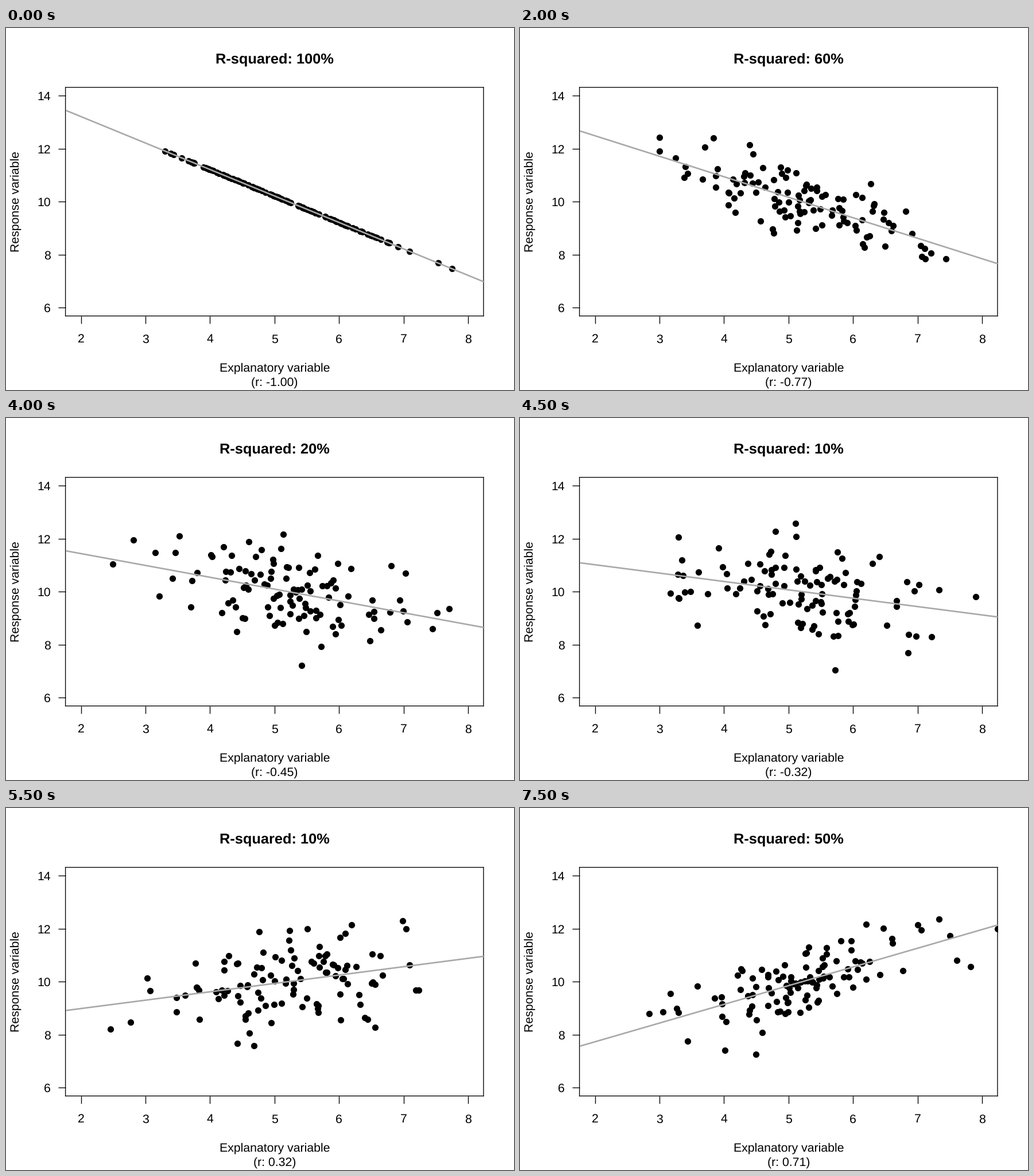
Animation of 885x632 px, one loop 8 s. Source, as a matplotlib script:

```python
import numpy as np
import matplotlib.pyplot as plt
from matplotlib.animation import FuncAnimation

W, H, DPI = 885, 632, 64
PT = 72 / DPI                      # points per pixel
LEFT, RIGHT, TOP, BOTTOM = 103.6, 831.9, 103.6, 502.7
X0, X1, Y0, Y1 = 1.76, 8.24, 5.68, 14.32
STEPS, N = 16, 110
MEAN_X, MEAN_Y = 5.215, 10

plt.rcParams.update({
    "font.family": "Liberation Sans",
    "text.hinting": "no_hinting",
    "axes.unicode_minus": False,
})


def correlation(step):
    """R-squared falls from 1 to 0 in tenths, then rises with r positive."""
    share = abs(10 - step) / 10
    return share, np.sqrt(share) * (-1 if step < 10 else 1) if share else 0.0


def standardize(v):
    return (v - v.mean()) / v.std(ddof=1)


def cloud(step, r):
    """Normal sample whose correlation is exactly r."""
    x, e = np.random.default_rng(70 + step).standard_normal((2, N))
    x = standardize(x)
    e = standardize(e - x * (e @ x) / (x @ x))
    return MEAN_X + x, MEAN_Y + r * x + np.sqrt(1 - r * r) * e


fig = plt.figure(figsize=(W / DPI, H / DPI), dpi=DPI, facecolor="white")
ax = fig.add_axes([LEFT / W, 1 - BOTTOM / H, (RIGHT - LEFT) / W, (BOTTOM - TOP) / H])
ax.set(xlim=(X0, X1), ylim=(Y0, Y1), xticks=range(2, 9), yticks=range(6, 15, 2))
ax.tick_params(length=12.6 * PT, width=1.35 * PT, labelbottom=False, labelleft=False)
for spine in ax.spines.values():
    spine.set(linewidth=1.35 * PT, snap=False)
for tick in ax.get_xticklines() + ax.get_yticklines():
    tick.set_snap(False)


def label(x, y, text="", size=21.2, **kw):
    """Text with its baseline at pixel (x, y) from the top left."""
    kw = {"ha": "center", "va": "baseline", "rotation_mode": "anchor", **kw}
    return fig.text(x / W, 1 - y / H, text, fontsize=size * PT, **kw)


for v in range(2, 9):
    label(LEFT + (v - X0) * (RIGHT - LEFT) / (X1 - X0), 549.3, str(v))
for v in range(6, 15, 2):
    label(78, BOTTOM - (v - Y0) * (BOTTOM - TOP) / (Y1 - Y0) + 7.8, str(v), ha="right")

MID = (LEFT + RIGHT) / 2
label(MID, 600, "Explanatory variable")
label(23, (TOP + BOTTOM) / 2, "Response variable", rotation=90)
title = label(MID, 61.5, size=25.4, weight="bold")
note = label(MID, 625)

dots, = ax.plot([], [], "o", color="black", ms=11.2 * PT, mew=0, zorder=3, snap=False)
fit, = ax.plot([], [], color="#a9a9a9", lw=2.65 * PT, zorder=4, snap=False)
ends = np.array([X0, X1])


def draw(step):
    share, r = correlation(step)
    dots.set_data(*cloud(step, r))
    fit.set_data(ends, MEAN_Y + r * (ends - MEAN_X))
    title.set_text(f"R-squared: {share:.0%}")
    note.set_text(f"(r: {r:.2f})")
    return dots, fit, title, note


anim = FuncAnimation(fig, draw, frames=STEPS, interval=500, repeat=True)
plt.show()
```
